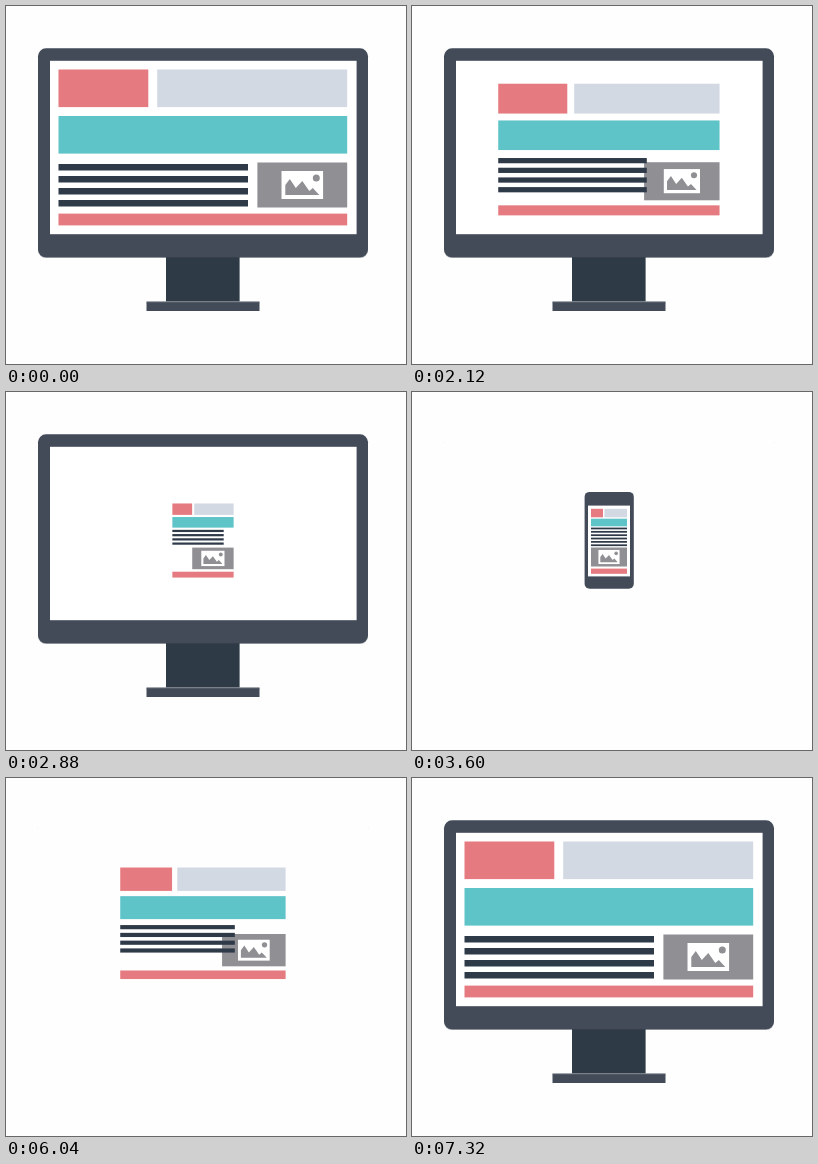
These frames come from a looping animation (400 px wide and 358 px high, 7.68 s). An HTML page:

```html
<!DOCTYPE html>
<html lang="en">
<head>
<meta charset="utf-8">
<title>Responsive layout</title>
<style>
  html, body { margin: 0; width: 100%; height: 100%; overflow: hidden; background: #fefefe; }
  svg { display: block; width: 100%; height: 100%; }
</style>
</head>
<body>
<svg id="stage" viewBox="0 0 400 358">
  <g id="monitor">
    <rect x="32" y="44" width="330" height="208" rx="8" fill="#a3a7ae"/>
    <rect x="160" y="251" width="73.6" height="46" fill="#2e3a46"/>
    <rect x="140.5" y="295.2" width="113" height="2" fill="#8d929b"/>
    <rect x="140.5" y="296.2" width="113" height="8.8" fill="#434b59"/>
    <rect x="32" y="42.3" width="330" height="209" rx="8" fill="#434b59"/>
    <rect x="44" y="54.8" width="306.6" height="173.4" fill="#fff"/>
  </g>
  <g id="phone">
    <rect x="172.6" y="99.9" width="49.2" height="96.8" rx="5" fill="#434b59"/>
    <rect x="176" y="113.6" width="42" height="70.8" fill="#fff"/>
  </g>
  <g id="content"></g>
</svg>
<script>
const LOOP = 7680, STEP = 40, MOVING_LINES = 4, PHONE_LINES = 6;
const RED = '#e57b80', PALE = '#d2d9e3', TEAL = '#5ec4c8', INK = '#2f3a49', GREY = '#8f8f94';
const $ = id => document.getElementById(id);

function add(parent, tag, attrs) {
  const el = document.createElementNS('http://www.w3.org/2000/svg', tag);
  for (const key in attrs) el.setAttribute(key, attrs[key]);
  return parent.appendChild(el);
}

const place = (el, box) => {
  for (const key in box) el.setAttribute(key, box[key]);
};

const wide = {
  x: 52.5, y: 63.5, width: 288.7, gap: 8.9, header: 37.6, banner: 37.6, footer: 11.8, footerGap: 6.1,
  logo: 89.8, image: { width: 89.8, height: 45 }, icon: { width: 42, height: 28 },
  text: 189.5, bodyGap: 10.4, line: 6.5, pitch: 12, imageY: 156.5
};
const narrow = {
  x: 179, y: 116.8, width: 36, gap: 1.4, header: 8.5, banner: 7.6, footer: 5.2, footerGap: 2.1,
  logo: 12, image: { width: 36, height: 19 }, icon: { width: 21.5, height: 14.4 },
  text: 36, bodyGap: 1.3, line: 1.75, pitch: 3.35, imageY: 155.5
};

const textLine = (s, i) => ({
  x: s.x,
  y: s.y + s.header + s.gap + s.banner + s.bodyGap + s.pitch * i,
  width: s.text,
  height: s.line
});

// Turns the sizes of one screen into the boxes of its parts.
function layout(s) {
  const { x, y, width, image, icon } = s;
  const paleX = x + s.logo + s.gap;
  const imageX = x + width - image.width;
  const boxes = {
    logo: { x, y, width: s.logo, height: s.header },
    title: { x: paleX, y, width: x + width - paleX, height: s.header },
    banner: { x, y: y + s.header + s.gap, width, height: s.banner },
    footer: { x, y: s.imageY + image.height + s.footerGap, width, height: s.footer },
    image: { x: imageX, y: s.imageY, ...image },
    icon: {
      x: imageX + (image.width - icon.width) / 2,
      y: s.imageY + (image.height - icon.height) / 2,
      ...icon
    }
  };
  for (let i = 0; i < MOVING_LINES; i++) boxes['line' + i] = textLine(s, i);
  return boxes;
}

function makeIcon() {
  const icon = add($('content'), 'svg', { viewBox: '0 0 42 28', preserveAspectRatio: 'none' });
  add(icon, 'rect', { width: 42, height: 28, fill: '#fff' });
  add(icon, 'path', { d: 'M4 24V14L8.5 8 14.5 17 21 10 28 20 31.5 17 38 24Z', fill: GREY });
  add(icon, 'circle', { cx: 35, cy: 7, r: 3.5, fill: GREY });
  return icon;
}

const fills = { logo: RED, title: PALE, banner: TEAL, footer: RED, image: GREY };
const from = layout(wide), to = layout(narrow);
const blocks = Object.keys(from).map(name => ({
  name,
  el: name === 'icon' ? makeIcon() : add($('content'), 'rect', { fill: fills[name] || INK })
}));

// The phone column has room for more lines than the ones that travel.
for (let i = MOVING_LINES; i < PHONE_LINES; i++) {
  place(add($('phone'), 'rect', { fill: INK }), textLine(narrow, i));
}

const ramp = (t, begin, end) => Math.min(1, Math.max(0, (t - begin) / (end - begin)));

function mix(a, b, amount) {
  const box = {};
  for (const key in a) box[key] = a[key] + (b[key] - a[key]) * amount;
  return box;
}

function draw(t) {
  const narrowness = ramp(t, 1800, 3000) - ramp(t, 5400, 6650);
  for (const { name, el } of blocks) place(el, mix(from[name], to[name], narrowness));
  $('monitor').setAttribute('opacity', 1 - ramp(t, 3000, 3600) + ramp(t, 6640, 7320));
  $('phone').setAttribute('opacity', ramp(t, 3000, 3600) - ramp(t, 5440, 6040));
}

const start = performance.now();
function tick() {
  const t = (performance.now() - start) % LOOP;
  draw(Math.floor(t / STEP) * STEP);
  requestAnimationFrame(tick);
}
tick();
</script>
</body>
</html>
```
